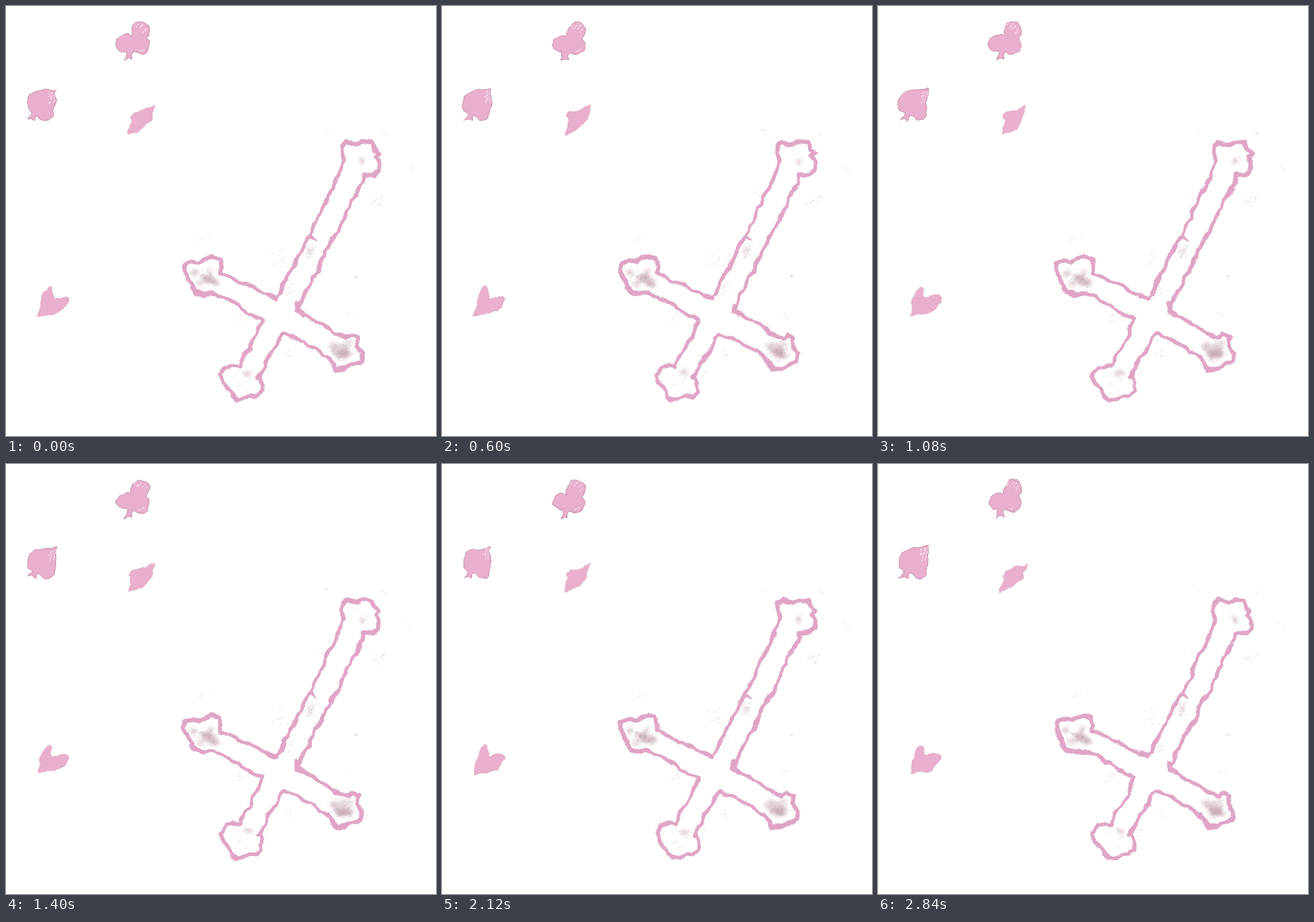
An HTML page that plays this animation: 600 px wide and 600 px high, repeating every 2.88 s.

```html
<!DOCTYPE html>
<html lang="en">
<head>
<meta charset="utf-8">
<title>Wobbling cross and card suits</title>
<style>
  html, body { margin: 0; width: 100%; height: 100%; overflow: hidden; background: #fff; }
  svg { display: block; width: 100vw; height: 100vh; }
  .suits { fill: #e9afcc; stroke: #dda6c1; stroke-width: .7; }
  .inked { stroke: #c595ae; stroke-width: 1; }
  .scratches { fill: none; stroke: #fff; stroke-width: 1.1; stroke-dasharray: 3 1.5; opacity: .75; }
  .cross { fill: none; stroke: #e0a5c5; stroke-linecap: round; stroke-linejoin: round; }
  .ends { stroke-width: 6; }
  .sides { stroke-width: 4.7; }
  .thick { stroke-width: 7; }
  .smudges { fill: #a8768a; }
</style>
</head>
<body>
<svg viewBox="0 0 600 600">
  <defs>
    <filter id="wobble" filterUnits="userSpaceOnUse" x="0" y="0" width="600" height="600" color-interpolation-filters="sRGB">
      <feTurbulence id="noise" type="fractalNoise" baseFrequency=".055" numOctaves="2" seed="1" result="n"/>
      <feDisplacementMap in="SourceGraphic" in2="n" scale="8" xChannelSelector="R" yChannelSelector="G"/>
    </filter>
    <filter id="soft" x="-50%" y="-50%" width="200%" height="200%"><feGaussianBlur stdDeviation="2.6"/></filter>
  </defs>
  <rect width="600" height="600" fill="#fff"/>
  <g filter="url(#wobble)">
    <g class="suits">
      <path class="inked" d="M175 42C174 31 178 23 186 22C196 21 202 28 200 36Q199 42 195 45C201 48 201 58 197 64C192 69 184 69 178 65L175 69L176 74L171 73L165 76L168 70L169 64C161 66 154 59 154 51C155 42 166 38 175 42Z"/>
      <path class="inked" d="M70 115Q67 121 69 130Q69 142 66 155Q61 160 53 160L46 154L42 154L41 161L36 157L30 158L36 151L35 148C28 144 28 132 33 125C39 120 45 118 53 118Q63 118 70 115Z"/>
      <path d="M207 138L204 148L203 158L191 171L181 176L171 180L174 166L176 160L173 154L178 148L194 145Z"/>
      <path d="M62 392Q55 394 51 403Q47 410 47 422L45 433L60 430L76 427Q82 422 85 415Q90 410 87 406Q80 402 66 408Q63 401 64 395Z"/>
    </g>
    <path class="scratches" d="M178 28l4-4M182 31l7-7M188 31l6-5M192 37l5-7M59 127l2-8M60 135l5-17M65 134l3-15M186 64l8-4"/>

    <g class="smudges" filter="url(#soft)">
      <ellipse cx="262" cy="373" rx="5" ry="3" opacity=".5"/>
      <ellipse cx="285" cy="373" rx="3" ry="8" opacity=".3" transform="rotate(25 285 373)"/>
      <ellipse cx="285" cy="383" rx="14" ry="6" opacity=".48" transform="rotate(25 285 383)"/>
      <ellipse cx="271" cy="388" rx="5" ry="4" opacity=".3"/>
      <ellipse cx="466" cy="479" rx="15" ry="8" opacity=".33" transform="rotate(30 466 479)"/>
      <ellipse cx="471" cy="486" rx="12" ry="6" opacity=".4"/>
      <ellipse cx="477" cy="472" rx="4" ry="8" opacity=".2"/>
      <ellipse cx="498" cy="217" rx="4" ry="3" opacity=".4"/>
      <ellipse cx="338" cy="513" rx="6" ry="4" opacity=".34"/>
      <ellipse cx="423" cy="343" rx="4" ry="7" opacity=".16"/>
    </g>
    <g id="specks" stroke="#9c7c8a" stroke-width=".8" stroke-linecap="round"></g>

    <g class="cross">
      <g class="ends">
        <path d="M471 216L468 203L469 193L475 189L483 193L490 194L497 190L511 191L515 200L521 206L516 210L521 219L520 230L512 236L499 235"/>
        <path d="M459 457L468 460L476 463L482 459L491 463L489 474L497 485L495 496L484 501L474 506L460 508L456 497L449 490"/>
        <path d="M354 517L357 527L357 538L350 545L340 544L331 549L319 550L315 541L311 535L303 526L299 515L306 505L318 501L326 503" stroke-width="5.2"/>
        <path d="M289 401L283 401L272 402L262 397L258 388L253 379L249 369L250 359L260 357L270 358L277 353L287 350L298 353L301 364L300 373"/>
      </g>
      <g class="sides">
        <path d="M499 235L497 246L491 254L489 263L483 270L481 280L475 286L473 296L468 303L463 316L456 323L452 333L447 342L445 351L438 359L433 372L428 379L424 390L417 400L413 412L407 424L417 431L429 438L444 446L459 457"/>
        <path d="M449 490L439 484L431 477L420 472L410 465L398 461L388 457L381 464L378 474L372 483L365 490L361 502L354 517"/>
        <path d="M326 503L331 488L340 478L344 467L350 459L354 447L358 437L346 433L334 426L325 418L314 414L303 406L289 401"/>
        <path d="M300 373L314 378L324 385L336 388L347 395L360 401L375 409L384 399L387 386L393 376L401 364L405 353L412 342L417 331L424 321L429 308L436 298L439 287L446 275L450 264L457 253L460 241L466 230L471 216"/>
      </g>
      <g class="thick">
        <path d="M407 417L407 426L414 430M366 404L376 408M259 392L264 399L276 402M456 498L460 506L471 506M316 545L322 550M469 194L474 190"/>
        <path d="M383 401L387 387L392 379M412 342L417 331L423 322M459 246L464 235M488 264L493 254M452 332L461 318M472 296L476 285M434 371L444 352M351 519L358 507" stroke-width="5.8"/>
      </g>
      <path d="M424 317L433 328L424 324Z" fill="#e0a5c5" stroke-width="1"/>
    </g>
  </g>
</svg>
<script>
  const FRAME_MS = 40, FRAMES = 72;

  let state = 11;
  const random = () => (state = state * 16807 % 2147483647) / 2147483647;
  const spread = size => (random() + random() - 1) * size;

  // Clusters: x, y, half width, half height, count, opacity
  const clusters = [
    [275, 326, 9, 9, 9, .22], [382, 348, 14, 20, 20, .24], [423, 343, 7, 13, 20, .3],
    [395, 392, 10, 16, 18, .28], [566, 228, 8, 5, 6, .25], [517, 271, 12, 9, 16, .32],
    [488, 377, 2, 2, 3, .5], [324, 438, 7, 9, 8, .25], [448, 177, 8, 5, 3, .2],
    [526, 178, 5, 4, 3, .25], [395, 488, 9, 9, 7, .25], [476, 432, 8, 6, 6, .22],
    [430, 478, 14, 9, 10, .25], [440, 263, 7, 9, 5, .2], [364, 518, 6, 9, 8, .22],
    [279, 379, 20, 18, 45, .3], [470, 481, 22, 19, 55, .32], [332, 521, 18, 22, 22, .25],
    [498, 214, 12, 14, 12, .25]
  ];
  const specks = document.getElementById("specks");
  for (const [x, y, w, h, count, opacity] of clusters) {
    let d = "";
    for (let i = 0; i < count; i++) {
      const length = .3 + random() * 2.4;
      d += `M${x + spread(w)} ${y + spread(h)}l${length} ${-length * .7}`;
    }
    const path = document.createElementNS("http://www.w3.org/2000/svg", "path");
    path.setAttribute("d", d);
    path.setAttribute("opacity", opacity);
    specks.append(path);
  }

  // A fresh noise field on every step makes the drawing boil.
  const noise = document.getElementById("noise");
  let shown = -1;
  function draw(now) {
    const step = Math.floor(now / FRAME_MS) % FRAMES;
    if (step !== shown) noise.setAttribute("seed", 1 + step * 97);
    shown = step;
    requestAnimationFrame(draw);
  }
  requestAnimationFrame(draw);
</script>
</body>
</html>
```
